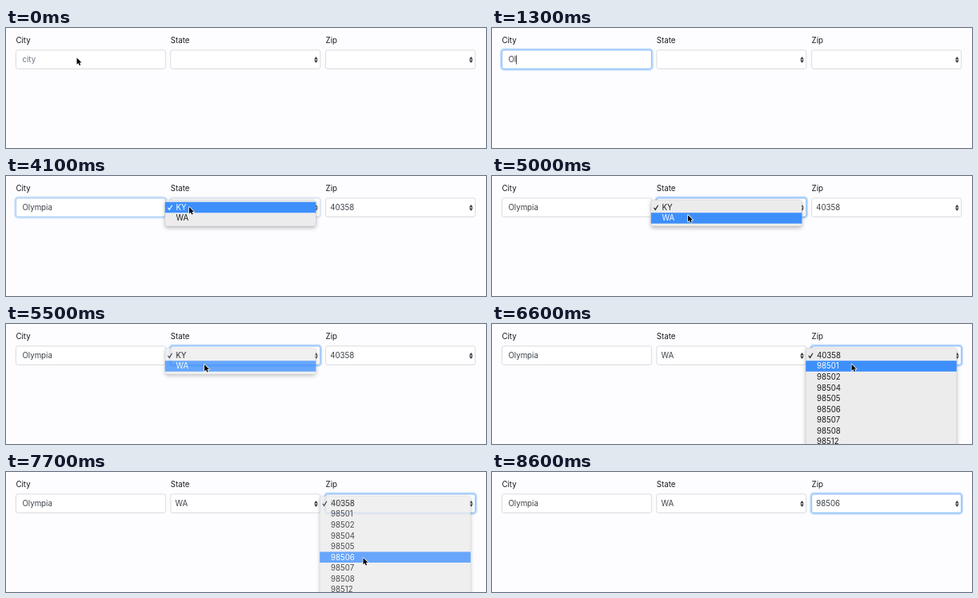
Animation of 600 by 151 pixels, one loop 9800 ms. Source, as an HTML page:

```html
<!DOCTYPE html>
<html lang="en">
<head>
<meta charset="utf-8">
<title>City, state and zip form</title>
<style>
  html, body { margin: 0; width: 100%; height: 100%; overflow: hidden; background: #fdfcfe; }
  svg { display: block; width: 600px; height: 151px; }
  text { font: 9.7px Inter, "Liberation Sans", sans-serif; fill: #3c4248; white-space: pre; }
  .label { fill: #16191c; }
  .hint { fill: #6c757d; }
  .field { fill: #fff; stroke: #ced4da; stroke-width: .8; }
  .arrows { fill: #343a40; }
  .ring { fill: none; opacity: 0; }
  .halo { stroke: #007bff; stroke-opacity: .25; stroke-width: 2; }
  .edge { stroke: #80bdff; stroke-width: .9; }
  .menu { opacity: 0; }
  .panel { fill: #ececed; stroke: #000; stroke-opacity: .12; stroke-width: .5;
           filter: drop-shadow(0 2.5px 2.5px rgba(0, 0, 0, .28)); }
  .bar { fill: #3d8ffc; }
  .menu text { fill: #1c1c1e; }
  .menu text.on { fill: #fff; }
  .tick { fill: none; stroke: #1c1c1e; stroke-width: 1.1; }
  .tick.on { stroke: #fff; }
  #caret { fill: #222; }
  #arrow { stroke: #fff; stroke-width: 1.5; stroke-linejoin: round; paint-order: stroke; }
  #beam { fill: none; stroke: #333; stroke-width: .8; }
</style>
</head>
<body>
<svg id="stage" viewBox="0 0 600 151" xmlns="http://www.w3.org/2000/svg">
  <g id="form"></g>
  <rect id="caret" y="34.3" width=".8" height="11.4"/>
  <g id="menus"></g>
  <g id="pointer">
    <path id="arrow" d="M0 0V8.4L1.9 6.6L3.2 9.6L4.7 9L3.4 6.1H6Z"/>
    <path id="beam" d="M-1.8 -3.2Q0 -3.2 0 -2V6.6Q0 7.8 -1.8 7.8M1.8 -3.2Q0 -3.2 0 -2M0 6.6Q0 7.8 1.8 7.8"/>
  </g>
</svg>
<script>
const LOOP = 9800, STEP = 100;
const ROW = 13.55, ROW_TOP = 32.7;
const $ = id => document.getElementById(id);

function add(parent, tag, attrs, content = '') {
  const el = document.createElementNS('http://www.w3.org/2000/svg', tag);
  for (const key in attrs) el.setAttribute(key, attrs[key]);
  el.textContent = content;
  return parent.appendChild(el);
}

function addField(x, label, pad, isSelect) {
  const form = $('form'), width = 187;
  const box = (cls, parent, grow) => add(parent, 'rect', {
    class: cls, x: x - grow, y: 27.8 - grow, rx: 2.5 + grow,
    width: width + 2 * grow, height: 23.6 + 2 * grow
  });
  add(form, 'text', { class: 'label', x, y: 19.2 }, label);
  box('field', form, 0);
  const ring = add(form, 'g', { class: 'ring' });
  box('halo', ring, 1.3);
  box('edge', ring, 0);
  if (isSelect) add(form, 'path', {
    class: 'arrows', d: `M${x + 181.7} 36l2.4 3.4h-4.8zm0 8l2.4 -3.4h-4.8z`
  });
  return { ring, value: add(form, 'text', { x: x + pad, y: 43.4 }) };
}

function addMenu(x, height, items) {
  const root = add($('menus'), 'g', { class: 'menu' });
  add(root, 'rect', { class: 'panel', x, y: 30.2, width: 188.6, height, rx: 3 });
  const bar = add(root, 'rect', { class: 'bar', x, width: 188.6, height: ROW });
  const tick = add(root, 'path', { class: 'tick', d: `M${x + 3.6} 39.9l1.8 2.5l3.4 -5.6` });
  const rows = items.map((item, i) =>
    add(root, 'text', { x: x + 13.8, y: ROW_TOP + i * ROW + 10.2 }, item));
  return { root, bar, tick, rows };
}

const city = addField(12.4, 'City', 8, false);
const state = addField(205.8, 'State', 5.8, true);
const zip = addField(399.6, 'Zip', 5.6, true);
const stateMenu = addMenu(198.8, 33, ['KY', 'WA']);
const zipMenu = addMenu(392.2, 160, ['40358', '98501', '98502', '98504', '98505',
  '98506', '98507', '98508', '98512', '98513']);

// Tracks are [time, value] pairs.
const cityFocus = [[0, 0], [300, 1], [4000, 1], [4300, 0]];
const stateFocus = [[4050, 0], [4350, 1], [6200, 1], [6500, 0]];
const zipFocus = [[6200, 0], [6500, 1]];
const stateShow = [[4000, 0], [4100, 1], [5400, 1], [5500, .78], [5800, 0]];
const zipShow = [[6200, 0], [6300, 1], [7600, 1], [7700, .78], [8000, 0]];
const pointerX = [[0, 88.5], [3400, 88.5], [4000, 229], [4400, 229], [5200, 248],
  [5700, 248], [6200, 451], [6400, 451], [6600, 449.5], [7100, 447.5], [7300, 446.5]];
const pointerY = [[0, 37.5], [3400, 37.5], [4000, 39], [4400, 39], [5200, 51],
  [5700, 51], [6200, 41], [6400, 41], [6600, 50.5], [7100, 104], [7300, 108]];
const typing = [[0, ''], [1000, 'O'], [1300, 'Ol'], [1500, 'Oly'], [2000, 'Olym'],
  [2300, 'Olymp'], [2500, 'Olympi'], [2800, 'Olympia']];
const stateValue = [[0, ''], [3000, 'KY'], [5600, 'WA']];
const zipValue = [[0, ''], [3100, '40358'], [7700, '98506']];

const smooth = k => k * k * (3 - 2 * k);
const hold = (track, t) => track.filter(p => p[0] <= t).pop()[1];

function mix(track, t, ease = k => k) {
  const i = track.findIndex(p => p[0] > t);
  if (i < 0) return track[track.length - 1][1];
  if (i === 0) return track[0][1];
  const [t0, a] = track[i - 1], [t1, b] = track[i];
  return a + (b - a) * ease((t - t0) / (t1 - t0));
}

const show = (el, on) => { el.style.visibility = on ? 'visible' : 'hidden'; };

function drawMenu(menu, alpha, y, blink) {
  menu.root.style.opacity = alpha;
  const row = blink ? -1 : Math.floor((y - ROW_TOP) / ROW);
  const lit = row >= 0 && row < menu.rows.length;
  menu.bar.style.opacity = lit ? 1 : 0;
  menu.bar.setAttribute('y', ROW_TOP + row * ROW);
  menu.rows.forEach((el, i) => el.classList.toggle('on', i === row));
  menu.tick.classList.toggle('on', row === 0);
}

function draw(t) {
  const x = mix(pointerX, t, smooth), y = mix(pointerY, t, smooth);
  const typed = hold(typing, t);

  city.value.textContent = typed;
  $('caret').setAttribute('x', 20.3 + (typed ? city.value.getComputedTextLength() : 0));
  show($('caret'), (t >= 100 && t < 600) || (t >= 1000 && t < 3200));
  city.value.textContent = typed || 'city';
  city.value.classList.toggle('hint', !typed);
  state.value.textContent = hold(stateValue, t);
  zip.value.textContent = hold(zipValue, t);

  city.ring.style.opacity = mix(cityFocus, t);
  state.ring.style.opacity = mix(stateFocus, t);
  zip.ring.style.opacity = mix(zipFocus, t);

  drawMenu(stateMenu, mix(stateShow, t), y, t === 5300);
  drawMenu(zipMenu, mix(zipShow, t), y, t === 7500);

  const visible = t < 1000 || (t >= 3500 && t < 8600);
  const overText = t >= 100 && x < 199;
  $('pointer').setAttribute('transform', `translate(${x} ${y})`);
  show($('arrow'), visible && !overText);
  show($('beam'), visible && overText);
}

const start = performance.now();
function tick() {
  const t = Math.max(0, performance.now() - start) % LOOP;
  draw(Math.floor(t / STEP) * STEP);
  requestAnimationFrame(tick);
}
tick();
</script>
</body>
</html>
```
